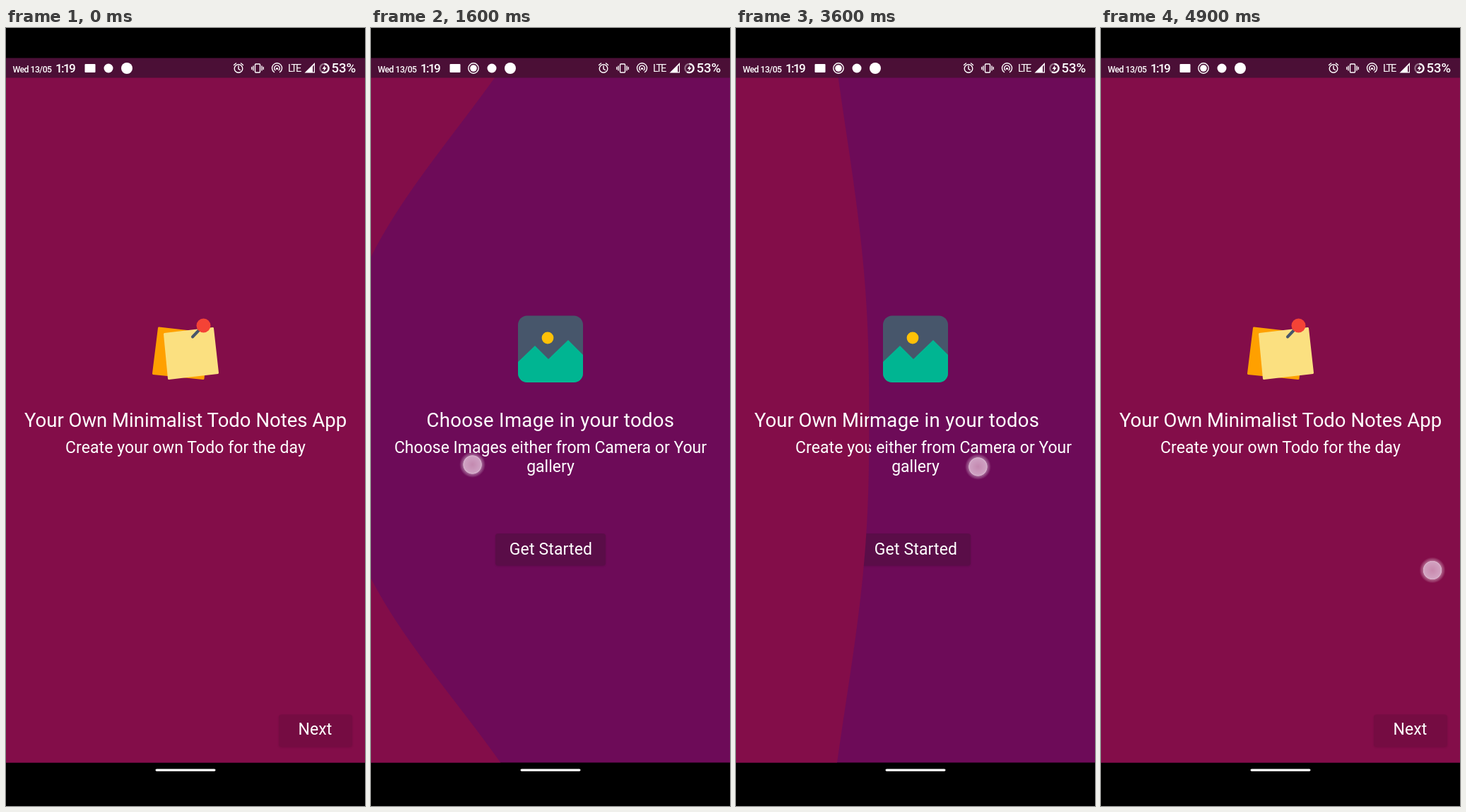
Write an HTML page that moves like this. It is 508x1102 px and loops after 5000 ms.

```html
<!DOCTYPE html>
<html lang="en">
<head>
<meta charset="utf-8">
<title>Todo notes intro</title>
<style>
  html, body { margin: 0; width: 100%; height: 100%; overflow: hidden; background: #000; }
  svg { display: block; width: 100vw; height: 100vh; font-family: Roboto, "Noto Sans", sans-serif; }
  text { fill: #fff; }
  .mid { text-anchor: middle; }
  .title { font-size: 27.5px; }
  .body { font-size: 23px; }
  .line { fill: none; stroke: #fff; stroke-width: 1.4; stroke-linecap: round; }
  .btn { filter: drop-shadow(0 1px 1px rgba(0, 0, 0, .12)); }
</style>
</head>
<body>
<svg viewBox="0 0 508 1102" preserveAspectRatio="none">
  <defs>
    <clipPath id="clip"><path id="wave"/></clipPath>
    <clipPath id="tile"><rect x="208" y="407.5" width="92" height="94.5" rx="13"/></clipPath>
    <radialGradient id="glow">
      <stop offset="0" stop-color="#d9a9c6" stop-opacity=".8"/>
      <stop offset=".6" stop-color="#dfbad4" stop-opacity=".85"/>
      <stop offset=".69" stop-color="#ead0e2" stop-opacity=".85"/>
      <stop offset=".73" stop-color="#fff" stop-opacity=".35"/>
      <stop offset="1" stop-color="#fff" stop-opacity="0"/>
    </radialGradient>
  </defs>
  <rect width="508" height="1102"/>

  <g id="imagePage">
    <rect y="70" width="508" height="970.5" fill="#6d0b58"/>
    <g clip-path="url(#tile)">
      <rect x="208" y="407" width="92" height="96" fill="#47566b"/>
      <path d="M207 474L232 450L251 469L279 442L301 464V503H207Z" fill="#00b592"/>
    </g>
    <circle cx="250" cy="439" r="8.4" fill="#ffc107"/>
    <text class="mid title" x="254" y="565" letter-spacing=".35">Choose Image in your todos</text>
    <text class="mid body" x="254" y="602">Choose Images either from Camera or Your</text>
    <text class="mid body" x="254" y="628.5">gallery</text>
    <g fill="#5a0d48">
      <rect class="btn" x="176" y="716" width="156" height="45.5" rx="4"/>
      <rect class="btn" x="18.5" y="972.5" width="104" height="45.5" rx="4"/>
    </g>
    <text class="mid body" x="254.5" y="745.5" letter-spacing=".15">Get Started</text>
    <text class="mid body" x="71" y="1001">Back</text>
  </g>

  <g id="notesPage" clip-path="url(#clip)">
    <rect y="70" width="508" height="970.5" fill="#830d49"/>
    <g stroke-width="3" stroke-linejoin="round">
      <path d="M216.5 425L286 433L279 496.5L208.5 489.5Z" fill="#ffa000" stroke="#ffa000"/>
      <path d="M224.5 433.5L292.5 425.5L299.5 488.5L230.5 496.5Z" fill="#fbe080" stroke="#fbe080"/>
    </g>
    <path d="M264 437.5L274 427" stroke="#47566b" stroke-width="4" stroke-linecap="round"/>
    <circle cx="279.5" cy="421.5" r="10" fill="#f44336"/>
    <text class="mid title" x="254" y="565">Your Own Minimalist Todo Notes App</text>
    <text class="mid body" x="254" y="602" letter-spacing=".08">Create your own Todo for the day</text>
    <rect class="btn" x="386" y="972.5" width="104" height="45.5" rx="4" fill="#750c42"/>
    <text class="mid body" x="437.5" y="1001" letter-spacing=".1">Next</text>
  </g>

  <g id="statusBar">
    <rect y="42.5" width="508" height="28" fill="#4b0f36"/>
    <text x="9.5" y="63" font-size="12.2" letter-spacing="-.5" font-weight="500">Wed 13/05</text>
    <text x="70" y="63" font-size="17.2" letter-spacing="-1.7" font-weight="500">1:19</text>
    <rect x="111.5" y="51" width="15" height="12" rx="1" fill="#fff"/>
    <g id="record">
      <circle class="line" cx="145" cy="57" r="7.2"/>
      <circle cx="145" cy="57" r="4.8" fill="#fff"/>
    </g>
    <g id="apps" fill="#fff">
      <circle cx="145" cy="57" r="6.5"/>
      <circle cx="171" cy="57" r="8"/>
    </g>
    <g class="line">
      <circle cx="329" cy="57.5" r="5.8"/>
      <path d="M329 54V58L331.5 59.5M322.5 52.5L325.5 50M335.5 52.5L332.5 50"/>
      <rect x="352.5" y="51" width="7" height="12" rx="1"/>
      <path d="M350 54V60M347.8 55.5V58.5M362 54V60M364.2 55.5V58.5"/>
      <path d="M379.5 62.5A7 7 0 1 1 387.5 62.5M381 59.8A3.8 3.8 0 1 1 386 59.8"/>
    </g>
    <circle cx="383.5" cy="57.5" r="1.6" fill="#fff"/>
    <text x="399" y="62" font-size="14.5" letter-spacing="-1.7">LTE</text>
    <path d="M422.5 63.5L437 49V63.5Z" fill="#fff"/>
    <path d="M434 54.5L435.8 52.5V62.2H434Z" fill="#4b0f36"/>
    <circle cx="450.5" cy="57" r="6.2" fill="none" stroke="#8f6a82" stroke-width="2.2"/>
    <path d="M450.5 50.8A6.2 6.2 0 1 1 447 62.2" fill="none" stroke="#fff" stroke-width="2.2"/>
    <path d="M451.5 52.5L447.5 58H450L449.5 61.5L453.5 56H451Z" fill="#fff"/>
    <text x="460.5" y="62.5" font-size="18.5" font-weight="500">53%</text>
  </g>
  <rect x="211.5" y="1049.5" width="85" height="3.2" rx="1.6" fill="#fff"/>
  <circle id="touch" r="18.5" fill="url(#glow)"/>
</svg>
<script>
const LOOP = 5000, STEP = 100, FADE = 130;
const W = 508, TOP = 70, H = 971, MID = TOP + H / 2;
const $ = id => document.getElementById(id);

const touches = [
  { down: 1200, up: 2000, from: [390, 570], to: [34, 640] },
  { down: 3400, up: 3900, from: [130, 640], to: [496, 608] },
  { down: 4800, up: 5000, from: [469, 768], to: [469, 768] }
];

const ramp = (v, from, to) => Math.min(1, Math.max(0, (v - from) / (to - from)));
const easeOut = (s, power) => 1 - (1 - s) ** power;
const smooth = s => s ** 3 * (10 - 15 * s + 6 * s * s);

// Share of the image page revealed: one swipe forward, one back
const reveal = t => t < 3000
  ? easeOut(ramp(t, 1212, 2900), 2.19)
  : 1 - easeOut(ramp(t, 3350, 4480), 1.7);

// Grows with the drag, then swings out like a damped spring
function waveDepth(p) {
  const max = W * .8;
  if (p <= .4) return 48 + (max - 48) * p / .4;
  if (p >= 1) return 0;
  const s = (p - .4) / .6;
  return max * Math.exp(-2.04 * s) * Math.cos(4.68 * s);
}

function wavePath(p) {
  if (p <= 0) return `M0 0H${W}V1102H0Z`;
  const edge = (W - 15) * (1 - ramp(p, .2, .8));
  const half = 82 + (H * .9 - 82) * ramp(p, 0, .4);
  const depth = waveDepth(p);
  let path = `M-500 ${TOP}`;
  for (let y = TOP; y <= TOP + H + 4; y += 4) {
    const near = Math.max(0, 1 - Math.abs(y - MID) / half);
    const x = edge - depth * smooth(near ** (y > MID ? 1.1 : 1.06));
    path += `L${x.toFixed(2)} ${y}`;
  }
  return path + "H-500Z";
}

function drawTouch(t) {
  const hit = touches.find(h => t >= h.down && t < h.up + FADE);
  $("touch").style.display = hit ? "" : "none";
  if (!hit) return;
  const s = easeOut(ramp(t, hit.down, hit.up), 1.7);
  const [x, y] = hit.from.map((v, i) => v + (hit.to[i] - v) * s);
  $("touch").setAttribute("transform", `translate(${x} ${y})`);
  $("touch").setAttribute("opacity", 1 - ramp(t, hit.up, hit.up + FADE));
}

function draw(t) {
  const p = reveal(t), recording = t >= 300;
  $("wave").setAttribute("d", wavePath(p));
  $("notesPage").style.display = p >= 1 ? "none" : "";
  $("record").style.display = recording ? "" : "none";
  $("apps").setAttribute("transform", `translate(${recording ? 26 : 0} 0)`);
  drawTouch(t);
}

const begin = performance.now();
function tick() {
  const t = (performance.now() - begin) % LOOP;
  draw(Math.floor(t / STEP) * STEP);
  requestAnimationFrame(tick);
}
tick();
</script>
</body>
</html>
```
